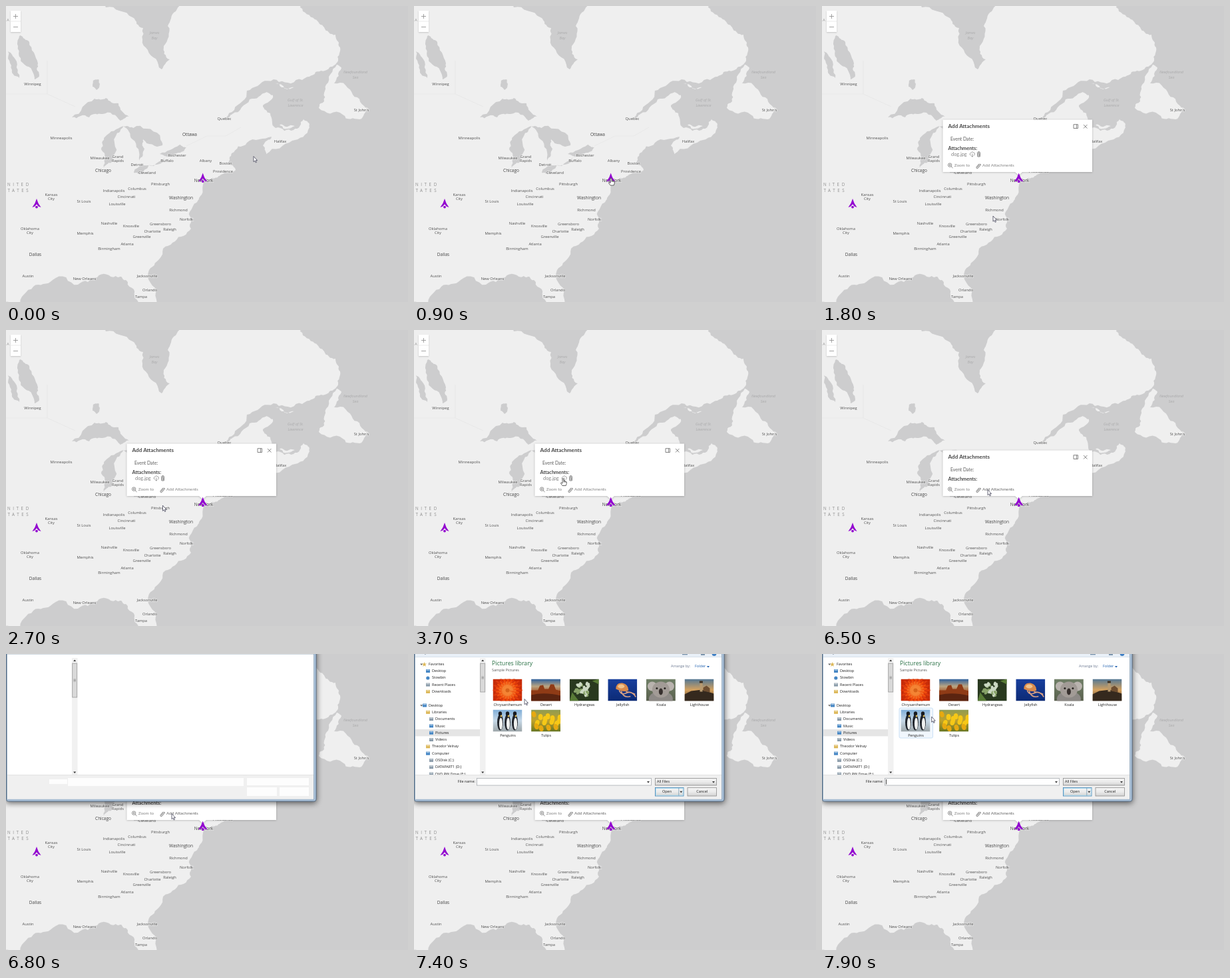
An HTML page with a canvas for the animation above (8000 ms loop, 604 by 444 pixels).

```html
<!DOCTYPE html>
<html lang="en">
<head>
<meta charset="utf-8">
<title>Map attachments</title>
<style>
  html, body { margin: 0; width: 100%; height: 100%; overflow: hidden; background: #cdcdce; }
  canvas { display: block; width: 604px; height: 444px; }
</style>
</head>
<body>
<canvas id="stage"></canvas>
<script>
const W = 604, H = 444, LOOP = 8000, STEP = 100;
const LAND = '#efefef', WATER = '#cdcdce';
const MAP_FONT = '"Open Sans", sans-serif', UI_FONT = 'Lato, sans-serif';
const TINY = `5.5px ${MAP_FONT}`;
const canvas = document.getElementById('stage');
const scale = window.devicePixelRatio || 1;

function layer(target) {
  target.width = W * scale;
  target.height = H * scale;
  const context = target.getContext('2d');
  context.scale(scale, scale);
  return context;
}
let ctx = layer(canvas);

// ---------- drawing helpers ----------
function rect(x, y, w, h, fill, stroke) {
  if (fill) { ctx.fillStyle = fill; ctx.fillRect(x, y, w, h); }
  if (stroke) { ctx.lineWidth = 0.8; ctx.strokeStyle = stroke; ctx.strokeRect(x, y, w, h); }
}
function shape(d, fill, stroke, width = 1) {
  const path = new Path2D(d);
  if (fill) { ctx.fillStyle = fill; ctx.fill(path); }
  if (stroke) { ctx.strokeStyle = stroke; ctx.lineWidth = width; ctx.stroke(path); }
}
function rounded(x, y, w, h, r, fill, stroke) {
  ctx.beginPath();
  ctx.roundRect(x, y, w, h, r);
  ctx.fillStyle = fill;
  ctx.fill();
  ctx.strokeStyle = stroke;
  ctx.lineWidth = 0.8;
  ctx.stroke();
}
function oval(x, y, rx, ry, fill, turn = 0) {
  ctx.fillStyle = fill;
  ctx.beginPath();
  ctx.ellipse(x, y, rx, ry, turn, 0, 7);
  ctx.fill();
}
function text(str, x, y, font, color, align = 'left', halo) {
  ctx.font = font;
  ctx.textAlign = align;
  ctx.textBaseline = 'middle';
  if (halo) {
    ctx.lineWidth = 1.4;
    ctx.strokeStyle = halo;
    ctx.strokeText(str, x, y);
  }
  ctx.fillStyle = color;
  ctx.fillText(str, x, y);
}
function shade(y0, y1, ...colors) {
  const g = ctx.createLinearGradient(0, y0, 0, y1);
  colors.forEach((c, i) => g.addColorStop(i / (colors.length - 1), c));
  return g;
}
function at(x, y, draw) {
  ctx.save();
  ctx.translate(x, y);
  draw();
  ctx.restore();
}
function clipped(x, y, w, h, draw) {
  ctx.save();
  ctx.beginPath();
  ctx.rect(x, y, w, h);
  ctx.clip();
  draw();
  ctx.restore();
}
function shadowed(color, blur, offset, draw) {
  ctx.save();
  ctx.shadowColor = color;
  ctx.shadowBlur = blur * scale;
  ctx.shadowOffsetY = offset * scale;
  draw();
  ctx.restore();
}
function seeded(seed) {
  return () => (seed = (seed * 16807) % 2147483647) / 2147483647;
}

// ---------- map ----------
const mainland = [
  '-20,-20 438,-20 442,2 464,20 478,32 495,43 500,60 499,82 486,92 465,99 445,111 410,114 378,120 355,143 330,168',
  '340,162 366,140 392,129 401,134 386,149 397,161 405,183 432,186 447,170 456,182 430,202 391,222 386,209 399,196 362,205 339,221 334,236 345,246 317,254 296,263',
  '290,288 281,300 277,320 278,334 254,353 233,376 215,396 214,410 230,450',
  '200,450 192,425 180,411 165,405 137,407 108,418 70,411 41,421 23,450 -20,450'
].join(' ');
const islands = [
  '497,88 504,93 493,116 521,133 544,153 531,170 506,163 470,153 478,143 481,118',
  '405,116 434,122 425,124', '411,178 434,180 424,184', '308,257 333,250 318,257'
];
const lakes = [
  '140,-12 150,2 190,17 206,33 213,66 234,95 246,80 237,60 243,30 255,8 270,-12',
  '21,44 35,54 48,86 50,104 43,110 28,88 18,60',
  '3,68 11,76 20,108 9,96',
  '99,167 133,139 150,138 169,146 185,166 172,172 145,162 125,167',
  '131,112 139,110 141,118 136,126 130,121',
  '149,196 176,180 165,195 158,235 147,243 143,215',
  '176,180 196,180 232,200 235,209 206,200 208,214 200,232 190,200',
  '192,250 200,241 239,226 233,236 201,252',
  '231,222 261,208 271,212 262,220'
];
// Names on two lines carry a slash.
const cities = `Winnipeg 40 117;Minneapolis 83 198;Milwaukee 141 228;Grand/Rapids 168 229;Detroit 197 238;
Cleveland 212 250;Rochester 257 224;Buffalo 242 232;Albany 300 232;Boston 330 236;Providence 326 248;Quebec 328 169;
Halifax 412 203;St_John's 534 156;Pittsburgh 232 267;Columbus 197 274;Indianapolis 162 277;Cincinnati 181 286;
Louisville 167 297;St_Louis 117 293;Kansas/City 68 286;Oklahoma/City 36 337;Nashville 155 326;
Knoxville 188 330;Memphis 119 341;Birmingham 155 364;Atlanta 182 357;Greenville 204 346;Charlotte 220 338;
Greensboro 232 327;Raleigh 246 335;Richmond 259 306;Norfolk 271 320;Austin 33 405;New_Orleans 118 409;
Jacksonville 212 405;Orlando 216 426;Tampa 203 436`;
const bigCities = 'Ottawa 276 193.5;Chicago 146 247;Washington 263 288;Dallas 44 373;New_York 297 262';
const seas = 'James/Bay 223 45;Newfoundland/Sea 525 104;Gulf_of_St./Lawrence 435 146';

// Splits each coast segment repeatedly, shifting the midpoints a little.
function coast(points, rnd) {
  let pts = points.split(' ').map(p => p.split(',').map(Number));
  for (let pass = 0; pass < 3; pass++) {
    pts = pts.flatMap((p, i) => {
      const q = pts[(i + 1) % pts.length], k = (rnd() - 0.5) * 0.4;
      const dx = q[0] - p[0], dy = q[1] - p[1];
      if (Math.hypot(dx, dy) > 60) return [p];
      return [p, [p[0] + dx / 2 - dy * k, p[1] + dy / 2 + dx * k]];
    });
  }
  return 'M' + pts.map(p => p.map(v => v.toFixed(1)).join(' ')).join('L') + 'Z';
}
function labels(list, font, color, lineHeight, halo) {
  list.split(';').forEach(item => {
    const [name, x, y] = item.trim().split(' ');
    const lines = name.replace(/_/g, ' ').split('/');
    lines.forEach((line, i) =>
      text(line, +x, +y + (i - (lines.length - 1) / 2) * lineHeight, font, color, 'center', halo));
  });
}
function marker(x, y) {
  at(x, y, () => {
    shape('M0-8Q1.5-1.5 6.6 5L2.6 3.4L0 .2L-2.6 3.4L-6.6 5Q-1.5-1.5 0-8Z', '#9307d0');
    oval(0, 4.6, 1.9, 1.9, '#9307d0');
  });
}
function zoomControl() {
  shadowed('rgba(0,0,0,.18)', 2, 0.5, () => rect(7, 7, 15, 32, '#fff'));
  rect(7, 22.6, 15, 0.8, '#e4e4e4');
  shape('M11 15.5H18M14.5 12V19M11 31.5H18', null, '#8c8c8c', 0.8);
}
function drawMap() {
  const rnd = seeded(71);
  rect(0, 0, W, H, WATER);
  [mainland, ...islands].forEach(p => shape(coast(p, rnd), LAND));
  lakes.forEach(p => shape(coast(p, rnd), WATER));
  shape('M62 82V132H0M62 132L104 151M271 210L302 195H330L353 182', null, '#e6e6e6', 0.7);
  const halo = 'rgba(243,243,243,.65)';
  labels(seas, `italic 5.6px ${MAP_FONT}`, '#aaaaab', 8);
  labels(cities, `5.8px ${MAP_FONT}`, '#4c4c4c', 6, halo);
  labels(bigCities, `6.5px ${MAP_FONT}`, '#404040', 6, halo);
  ctx.letterSpacing = '3.6px';
  text('NITED', 2, 268, `6.2px ${MAP_FONT}`, '#8f8f8f');
  text('TATES', 2.5, 277, `6.2px ${MAP_FONT}`, '#8f8f8f');
  ctx.letterSpacing = '0px';
  text('A', 1, 21, `6px ${MAP_FONT}`, '#999');
  marker(46, 297);
  marker(295.7, 258.5);
  zoomControl();
}

// ---------- popup ----------
function popup(hasFile, pressed) {
  const top = hasFile ? 170.5 : 180.5;
  const body = `6.9px ${UI_FONT}`, link = `6.3px ${UI_FONT}`, grey = '#6e6e6e';
  shadowed('rgba(0,0,0,.26)', 3, 0.6, () =>
    shape(`M181.5 ${top}H406V249H301L295.7 254L290 249H181.5Z`, '#fff'));
  at(0, top, () => {
    text('Add Attachments', 189.5, 10.5, `bold 8.1px ${UI_FONT}`, '#484848');
    shape('M378 7.2H384.5V13H378ZM382.4 7.2V13M393 7.5L398.5 13M398.5 7.5L393 13', null, '#666', 0.8);
    text('Event Date:', 193, 29, body, '#5c5c5c');
    text('Attachments:', 189.5, 43, `bold 7.4px ${UI_FONT}`, '#484848');
    if (!hasFile) return;
    text('dog.jpg', 194, 52.2, `7.4px ${UI_FONT}`, '#808080');
    shape('M223.8 53.6Q221.5 53 222.3 50.8Q223.3 49.5 224 49.8Q225.5 47 227.6 49.2Q229.8 49.6 229.4 52Q229 53.6 227.8 53.6M225.8 51V55.6M224.4 54.3L225.8 55.8L227.2 54.3', null, '#777', 0.7);
    shape('M232.8 49.5H238.4M234.7 49V48.1H236.5V49M233.5 50.7H237.7L237.3 55.5H233.9ZM234.9 51.5V54.8M236.4 51.5V54.8', null, '#606060', 0.7);
  });
  shape('M194.8 238.6A2.7 2.7 0 1 0 189.4 238.6A2.7 2.7 0 1 0 194.8 238.6M194 240.6L196.6 243M190.8 238.6H193.4M192.1 237.3V239.9', null, grey, 0.8);
  text('Zoom to', 198.8, 239.3, link, '#848484');
  shape('M233.2 242.2L237 237.6Q238.7 236.4 238.2 238.6L234.4 243.2Q231.6 244.5 232.2 241.3L236 236.7', null, grey, 0.9);
  text('Add Attachments', 241, 239.3, link, pressed ? '#666' : '#848484');
}

// ---------- file dialog ----------
// Indent depth, icon tone, name; an empty line leaves a gap.
const tree = `0 gold Favorites
1 blue Desktop
1 blue Stowbin
1 grey Recent Places
1 gold Downloads

0 blue Desktop
1 gold Libraries
2 grey Documents
2 blue Music
2 blue Pictures
2 grey Videos
1 gold Theodor Velnay
1 blue Computer
2 grey OSDisk (C:)
2 grey DATAPART1 (D:)
2 grey DVD RW Drive (E:)`.split('\n');
const tones = { gold: '#dcb757', blue: '#4586c4', grey: '#8c9dab' };

// Each painter fills a 44 by 33 thumbnail.
function sky(...colors) { rect(0, 0, 44, 33, shade(0, 33, ...colors)); }
const pictures = {
  Chrysanthemum() {
    sky('#c72c08', '#c72c08');
    for (let ring = 0; ring < 4; ring++) {
      for (let a = ring * 0.2; a < 6.4; a += Math.PI / 9) {
        const r = 18 - ring * 4.5;
        oval(22 + r * Math.cos(a), 17 + r * Math.sin(a), 4.5, 1.4, `hsl(${13 + ring * 4} 90% ${46 + ring * 4}%)`, a);
      }
    }
    oval(22, 17, 3, 3, '#d8641a');
  },
  Desert() {
    sky('#2d5f9c', '#b9a482', '#a4420f', '#4f1d0a');
    shape('M0 17H10L13 10L18 9L20 15H26L29 8L34 8L37 16L44 18V33H0Z', '#8f3b16');
    shape('M0 24Q20 19 44 25V33H0Z', '#5b2410');
  },
  Hydrangeas() {
    sky('#29391f', '#29391f');
    const rnd = seeded(9);
    for (let i = 0; i < 34; i++) {
      const a = rnd() * 6.3, r = rnd() * 12;
      oval(22 + r * 1.2 * Math.cos(a), 16 + r * 0.8 * Math.sin(a), 3, 2, i % 3 ? '#cbd8c2' : '#87a268', a);
    }
    shape('M0 33L4 20L14 33ZM44 8L34 3L44 0Z', '#587b36');
  },
  Jellyfish() {
    sky('#183f9d', '#0c2a75');
    shape('M12 15Q12 5 22 6Q31 8 31 17Q25 21 12 15Z', '#d98b4c');
    shape('M17 17Q20 25 28 21T42 27M20 18Q23 29 34 26M27 19Q36 20 41 23', null, '#d8a184', 1.5);
    oval(20, 11, 5, 3, '#efc38d');
  },
  Koala() {
    sky('#718068', '#59604d');
    oval(22, 30, 18, 12, '#8d8986');
    for (const side of [-1, 1]) oval(22 + 13 * side, 11, 7, 7, '#b9b3ae');
    oval(22, 16, 13, 12, '#a29b96');
    for (const side of [-1, 1]) oval(22 + 6 * side, 14, 1.5, 1.5, '#292421');
    oval(22, 19, 3, 5, '#37302e');
  },
  Lighthouse() {
    sky('#527795', '#d5a25f', '#4e3822');
    shape('M0 23L10 18L26 16L44 22V33H0Z', '#35291e');
    rect(23, 6, 4, 13, '#b79a70');
    rect(22.4, 3, 5, 3, '#3d3022');
    shape('M28 18V13L33 10L38 14V20Z', '#6e4e31');
  },
  Penguins() {
    sky('#7faed8', '#c6d8e7', '#9ca5a8');
    for (let x = 11; x < 40; x += 11) {
      oval(x, 19, 4.5, 12, '#20242b');
      oval(x + 1, 21, 2.6, 9, '#eef0ef');
      oval(x, 6, 2.7, 3.2, '#171a20');
      oval(x + 1.5, 9.5, 1.3, 1.5, '#ddb64e');
    }
  },
  Tulips() {
    sky('#8f9b52', '#c0a22b', '#667522');
    for (let i = 0; i < 15; i++) {
      oval(4 + i * 17 % 40, 7 + i * 7 % 22, 3.4, 4.6, i % 3 ? '#f6c817' : '#e6a910', (i % 3 - 1) * 0.3);
    }
  }
};

function arrowHead(x, y, dir = 1, color = '#333') {
  shape(`M${x - 2} ${y - dir}H${x + 2}L${x} ${y + 1.5 * dir}Z`, color);
}
function button(x, y, w, h, border) {
  rect(x, y, w, h, shade(y, y + h, '#f5f5f5', '#ebebeb', '#d2d2d2'), border);
}
function dialogFrame() {
  shadowed('rgba(0,0,0,.6)', 8, 2, () => rounded(0.5, -10, 465.5, 231, 3, '#b4cbe3', '#465f79'));
  rect(1.6, 0, 461, 218, '#fff', '#8da3b9');
  rect(2, 181, 460, 36.5, '#f0f0f0');
  rect(2, 181, 460, 0.7, '#dfdfdf');
}
function scrollBar(thumbHeight) {
  rect(99, 6, 8.5, 175, '#f1f1f1');
  arrowHead(103.2, 10, -1);
  arrowHead(103.2, 177.5);
  rect(99.7, 14, 7, thumbHeight, '#d9d9d9', '#9a9a9a');
  for (let i = -1; i <= 1; i++) rect(101.5, 13.7 + thumbHeight / 2 + i * 1.5, 3.5, 0.6, '#777');
}
function emptyDialog() {
  dialogFrame();
  scrollBar(51);
  const blank = '#fdfdfd';
  rect(65, 188, 27, 7, blank);
  rect(93, 186, 264, 12, blank);
  rect(362, 186, 93, 11, blank);
  rect(362, 200, 45, 13, blank);
  rect(411, 200, 44, 13, blank);
}
function treePane() {
  rect(2, 113, 97, 10.4, '#e5e5e5');
  tree.forEach((line, row) => {
    if (!line) return;
    const [depth, tone, ...words] = line.split(' ');
    const name = words.join(' '), color = tones[tone];
    at(22 + depth * 5, 15.4 + row * 10.3, () => {
      if (name === 'Favorites') shape('M-6.5-3.5L-5.5-1L-3-1L-4.9.7L-4.2 3.3L-6.5 1.8L-8.8 3.3L-8.1.7L-10-1L-7.5-1Z', color);
      else if (name === 'Stowbin') oval(-6.2, 0, 2.6, 2.6, color);
      else {
        rect(-9, -2.7, 6, 5, color);
        rect(-8.4, -2.2, 4.8, 1.4, 'rgba(255,255,255,.5)');
      }
      if (depth === '0') arrowHead(-10.8, 0, 1, '#666');
      text(name, 0, 0, TINY, '#1e1e1e');
    });
  });
}
function pictureGrid(hovered) {
  Object.entries(pictures).forEach(([name, paint], i) => {
    at(118.5 + i % 6 * 57.6, 37.5 + Math.floor(i / 6) * 46, () => {
      if (name === hovered) rounded(-2.5, -2.5, 50.5, 45, 2, '#f1f7fd', '#bfdaf3');
      text(name, 22.5, 38.8, TINY, '#1e1e1e', 'center');
      clipped(0, 0, 44, 33, paint);
    });
  });
}
function fileDialog(hovered, caret) {
  dialogFrame();
  rect(2, 0, 460, 4.5, '#e9f0f8');
  rect(2, 4.2, 460, 0.7, '#ccd8e5');
  text('y', 16, -1, TINY, '#345');
  rect(403, 0, 8, 1.4, '#7d96ae');
  rect(431, 0, 6, 2, '#7d96ae');
  oval(451, -0.5, 3.4, 3.4, '#3e7fc4');
  clipped(2, 4, 97, 177, treePane);
  scrollBar(43);
  text('Pictures library', 117, 15, `8.8px ${MAP_FONT}`, '#287044');
  text('Sample Pictures', 117, 24.6, TINY, '#555');
  text('Arrange by:', 386, 19, TINY, '#6b7890');
  text('Folder', 422, 19, TINY, '#1e5fae');
  arrowHead(442, 19, 1, '#1e5fae');
  pictureGrid(hovered);
  text('File name:', 92, 191.5, TINY, '#1e1e1e', 'right');
  rect(94.5, 186.5, 262, 10.5, '#fff', '#a8acb1');
  arrowHead(352, 192);
  if (caret) rect(96.2, 188, 0.8, 7.5, '#111');
  button(362.5, 186.5, 92, 10.5, '#8d8d8d');
  text('All Files', 365, 191.6, TINY, '#1e1e1e');
  arrowHead(450, 192);
  button(362.5, 200.5, 42.5, 12.5, '#3c7fb1');
  rect(363.4, 201.4, 40.7, 10.7, null, '#a5dcf4');
  rect(397.5, 201, 0.7, 11.5, '#6b93ae');
  text('Open', 380, 206.6, TINY, '#1e1e1e', 'center');
  arrowHead(401.3, 206.7);
  button(411, 200.5, 43.5, 12.5, '#8d8d8d');
  text('Cancel', 432.7, 206.6, TINY, '#1e1e1e', 'center');
}

// ---------- pointer ----------
const moves = [
  { from: 0, to: 900, x: 296, y: 258 },
  { from: 1400, to: 1800, x: 257, y: 315 },
  { from: 2200, to: 3100, x: 220, y: 226 },
  { from: 3100, to: 3400, x: 224, y: 222.5 },
  { from: 3700, to: 4700, x: 236, y: 222.5 },
  { from: 5100, to: 5200, x: 236.5, y: 243 },
  { from: 5200, to: 6000, x: 249, y: 239.5 },
  { from: 6800, to: 7400, x: 166, y: 67.5 },
  { from: 7500, to: 7800, x: 164.7, y: 94 }
];
function pointerAt(t) {
  let x = 372, y = 225.5;
  for (const move of moves) {
    const k = Math.min(1, Math.max(0, (t - move.from) / (move.to - move.from)));
    const eased = k * k * (3 - 2 * k);
    x += (move.x - x) * eased;
    y += (move.y - y) * eased;
  }
  return [x, y];
}
const isHand = t => (t >= 800 && t < 1500) || (t >= 3000 && t < 6500);
function pointer(t) {
  at(...pointerAt(t), () => isHand(t)
    ? shape('M-1 .8Q0-.6 1 .8V4L2.6 4.2L4.2 4.7L5.2 5.5V8L4.2 11H-1L-3.3 7.8Q-3.8 6.2-2.2 6.6L-1 7.7ZM1 4V6M2.7 4.4V6M4.2 4.8V6.2', '#fff', '#333', 0.75)
    : shape('M0 0V8.2L1.8 6.6L3.2 9.4L4.5 8.8L3.2 6.1H5.6Z', '#fff', '#45455a', 0.8));
}

// ---------- playback ----------
const screen = ctx;
const mapLayer = document.createElement('canvas');
ctx = layer(mapLayer);
drawMap();
ctx = screen;

function draw(t) {
  ctx.drawImage(mapLayer, 0, 0, W, H);
  if (t >= 1400) {
    popup(t < 5100, t >= 6500);
    marker(295.7, 258.5);
  }
  if (t >= 6900) fileDialog(t >= 7700 && 'Penguins', t >= 7700);
  else if (t >= 6800) emptyDialog();
  pointer(t);
}
const start = performance.now();
function tick() {
  const elapsed = (performance.now() - start) % LOOP;
  draw(Math.floor(elapsed / STEP) * STEP);
  requestAnimationFrame(tick);
}
tick();
</script>
</body>
</html>
```
